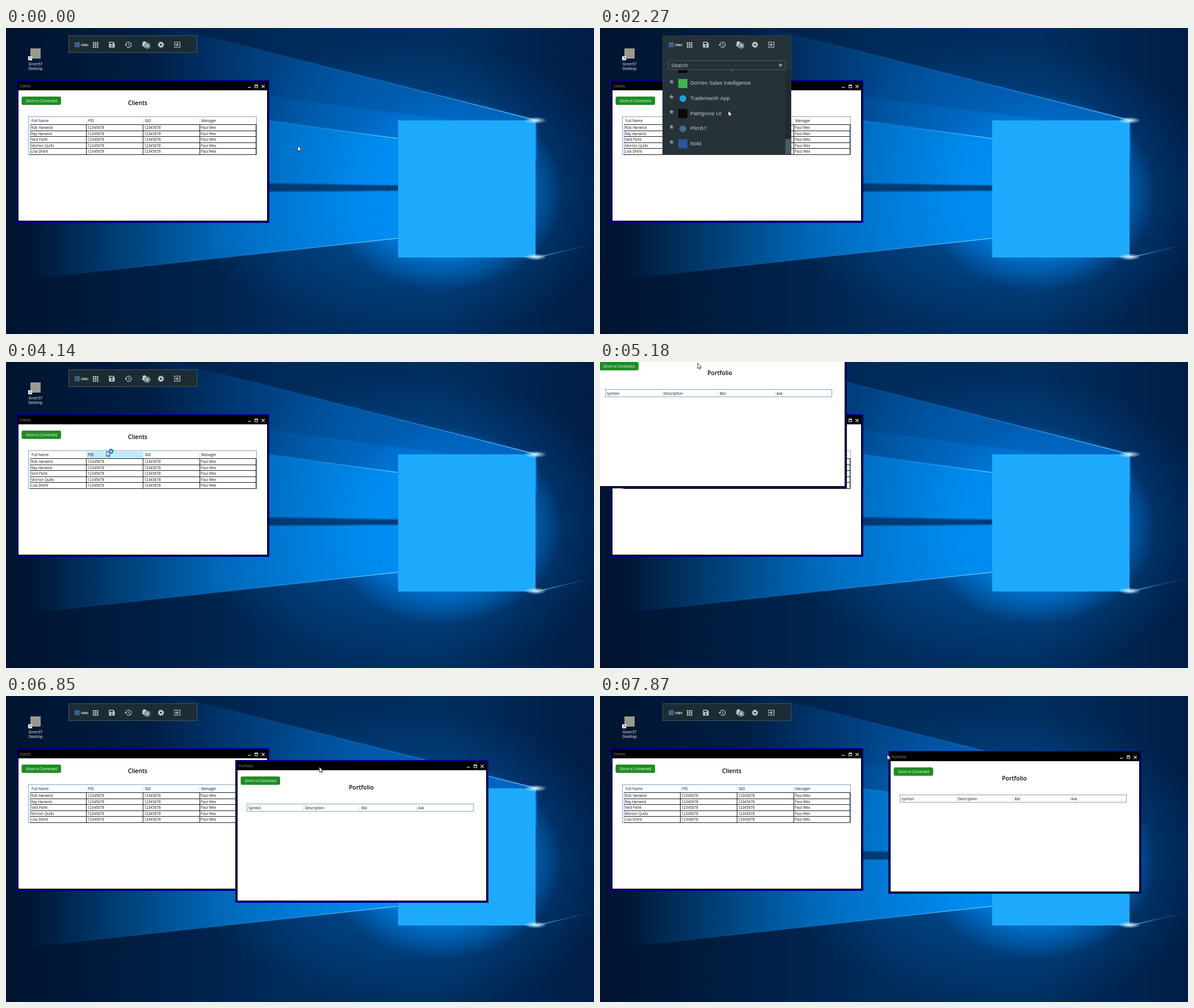
Recreate the animation shown at these times as an HTML page with a canvas. Size 1036 by 540 pixels, loop 8000 ms.

```html
<!DOCTYPE html>
<html lang="en">
<head>
<meta charset="utf-8">
<title>Desktop demo</title>
<style>
html, body { margin: 0; width: 100%; height: 100%; overflow: hidden; background: #001a3c; }
canvas { display: block; }
</style>
</head>
<body>
<canvas id="stage" width="1036" height="540"></canvas>
<script>
const W = 1036, H = 540, LOOP = 8000, TICK = 120, ROW = 26.6, COL = 99.7;
const UI = '"Open Sans", "Noto Sans", sans-serif';
const ARIAL = '"Liberation Sans", Arial, sans-serif';
const stage = document.getElementById('stage').getContext('2d');
let g = stage;

// A move starts at a time and takes some ticks to reach its goal; the picture jumps once per tick.
const move = (start, steps, ...goal) => ({ start, steps, goal });
const pointer = [
  move(0, 1, 514, 208), move(400, 4, 154, 28), move(1370, 4, 226, 146), move(3000, 3, 177, 157),
  move(4820, 4, 172, 2), move(6610, 1, 266, 10), move(6730, 2, 552, 125), move(6970, 5, 656, 108),
  move(7630, 3, 506, 103)
];
const scroll = [move(0, 1, 0), move(1610, 6, 222), move(2550, 2, 107)];
const folio = [move(4420, 1, -11, -29), move(6610, 1, 75, -11), move(6730, 2, 404, 113), move(6970, 4, 508, 97)];

function follow(moves, t) {
  let pos = moves[0].goal;
  for (const { start, steps, goal } of moves) {
    if (t < start) break;
    const p = Math.min(1, (Math.floor((t - start) / TICK) + 1) / steps);
    pos = pos.map((v, i) => Math.round(v + (goal[i] - v) * p));
  }
  return pos;
}
const within = (t, from, to) => t >= from && t < to;

const DARK = '#0a0a08', BLUE = '#3f6a95';
const apps = [
  ['QLN Action tester', DARK, 'bell'], ['QLN Management Console', BLUE, 'disc'], ['Java Demo', DARK],
  ['Manual notifications', BLUE, 'disc'], ['Polbrin Adapter', '#fff'], ['Polbrin Hello', '#fff'],
  ['Orders', DARK], ['Portfolio', DARK], ['Portfolio Summary', DARK],
  ['DorVex Sales Intelligence', '#3db54a'], ['Trademarsh App', '#1fa3e0', 'disc'], ['Pathgrove UI', DARK],
  ['Plim57', BLUE, 'disc'], ['Nold', '#2b579a']
];
const people = ['Rob Hanwick', 'Ray Hanwick', 'Ned Parle', 'Morton Quills', 'Lisa Drent'];

function box(x, y, w, h, fill) { g.fillStyle = fill; g.fillRect(x, y, w, h); }
function frame(x, y, w, h, color) { g.strokeStyle = color; g.lineWidth = 1; g.strokeRect(x + .5, y + .5, w - 1, h - 1); }
function disc(x, y, r, fill) { g.fillStyle = fill; g.beginPath(); g.arc(x, y, r, 0, 7); g.fill(); }
function ring(x, y, r, width, color, from = 0, to = 7) {
  g.strokeStyle = color; g.lineWidth = width;
  g.beginPath(); g.arc(x, y, r, from, to); g.stroke();
}
function path(points) { g.beginPath(); points.forEach(([x, y]) => g.lineTo(x, y)); }
function shape(points, fill) { path(points); g.closePath(); g.fillStyle = fill; g.fill(); }
function line(points, color, width = 1) { path(points); g.strokeStyle = color; g.lineWidth = width; g.stroke(); }
function text(s, x, y, font, color, align = 'left') {
  g.font = font; g.fillStyle = color; g.textAlign = align;
  g.fillText(s, x, y);
}
const label = (s, x, y, color = '#111') => text(s, x, y + 2.3, '6.4px ' + UI, color);

function ramp(x0, x1, ...stops) {
  const r = g.createLinearGradient(x0, 0, x1, 0);
  stops.forEach((c, i) => r.addColorStop(i / (stops.length - 1), c));
  return r;
}
function glow(x, y, rx, ry, color, core = 0) {
  const r = g.createRadialGradient(0, 0, core, 0, 0, 1);
  r.addColorStop(0, color);
  r.addColorStop(1, color.slice(0, 7) + '00');
  g.save(); g.translate(x, y); g.scale(rx, ry);
  box(-1, -1, 2, 2, r);
  g.restore();
}
// Light fan between two edges, fading out to the left; edges are given as y at x0 and x1.
function beam(x0, x1, top, bottom, color) {
  g.filter = 'blur(1px)';
  shape([[x0, top[0]], [x1, top[1]], [x1, bottom[1]], [x0, bottom[0]]], ramp(x0, x1, color + '00', color + 'a0', color));
  g.filter = 'none';
}
const ray = (x0, y0, x1, y1) => line([[x0, y0], [x1, y1]], ramp(x0, x1, '#1080d800', '#1486dc80', '#60c8ff'), 1.5);

function makeWallpaper() {
  const c = document.createElement('canvas');
  c.width = W; c.height = H;
  g = c.getContext('2d');
  box(0, 0, W, H, ramp(0, W, '#00142f', '#001e44', '#002c5c', '#002e5e', '#001d45'));
  glow(710, 285, 390, 265, '#0058a8c0', .2);
  glow(770, 290, 210, 175, '#0084ec', .5);
  beam(250, 935, [-12, 163], [90, 182], '#0068c4');
  beam(250, 935, [90, 182], [134, 232], '#0078dc');
  beam(200, 692, [126, 195], [271, 277], '#008cf0');
  beam(40, 692, [289, 288], [443, 371], '#008cf0');
  beam(200, 692, [274, 278], [289, 287], '#003a70');
  ray(345, 13, 935, 163);
  ray(350, 149, 690, 195);
  ray(60, 440, 690, 371);
  ray(1036, 381, 935, 405);
  box(691, 163, 242, 242, '#1eaafc');
  for (const y of [163, 404]) glow(933, y, 20, 6, '#d8f4ff');
  g = stage;
  return c;
}

function shortcut() {
  box(43, 36, 18, 18, '#9a9a8c');
  box(39, 50, 7, 7, '#f4f4f4');
  line([[40.5, 55.5], [44, 52]], '#2468b0');
  line([[41.5, 52], [44, 52], [44, 54.5]], '#2468b0');
  ['Grom57', 'Desktop'].forEach((s, i) => text(s, 52, 66 + i * 8.2, '6.5px ' + UI, '#fff', 'center'));
}

function bell(x, y, color) {
  g.beginPath(); g.arc(x, y - 2, 3.5, Math.PI, 0);
  g.lineTo(x + 3.5, y + 1); g.lineTo(x + 5, y + 3); g.lineTo(x - 5, y + 3); g.lineTo(x - 3.5, y + 1);
  g.fillStyle = color; g.fill();
  disc(x, y + 4.3, 1.3, color);
}
function star(x, y, r, color) {
  shape(Array.from({ length: 10 }, (_, i) => {
    const a = i * Math.PI / 5 - Math.PI / 2, q = i % 2 ? r * .42 : r;
    return [x + q * Math.cos(a), y + q * Math.sin(a)];
  }), color);
}

function toolbar(open, hover) {
  const ink = '#c3ced2', back = '#1c2c34', height = open ? 210 : 31, y = 29.5;
  box(110, 13, 226.5, height, open ? '#263238' : back);
  frame(110, 13, 227, open ? height : 31, open ? '#2f3d43' : '#42555a');
  box(121, 25, 9, 9, '#37648c');
  text('ORBA', 132, 31.6, 'bold 4.5px ' + ARIAL, '#e8eef0');
  for (let i = 0; i < 9; i++)
    box(153 + i % 3 * 3.6, 25 + (i / 3 | 0) * 3.6, 2.5, 2.5, hover ? '#e4e620' : ink);

  shape([[181.5, 24.5], [189, 24.5], [191.5, 27], [191.5, 34.5], [181.5, 34.5]], ink);
  box(183, 26, 5.5, 2.5, back);
  disc(186.5, 31.5, 1.6, back);

  ring(216, y, 4.7, 1.2, ink, -Math.PI, 2.3);
  shape([[209, 29], [213.6, 29], [211.3, 31.8]], ink);
  line([[216, 27], [216, 30], [218.3, 31.3]], ink);

  bell(244, 29, ink);
  disc(249, 31.2, 5.4, '#7c8b91');
  text('8', 249, 33.4, 'bold 6px ' + ARIAL, '#fff', 'center');

  ring(273, y, 3.1, 2.6, ink);
  g.setLineDash([1.8, 1.81]);
  ring(273, y, 4.6, 2, ink);
  g.setLineDash([]);

  line([[297, 27.5], [297, 25], [306.5, 25], [306.5, 34], [297, 34], [297, 31.5]], ink, 1.2);
  line([[296, y], [303, y]], ink, 1.2);
  line([[300.8, 27], [303.3, y], [300.8, 32]], ink, 1.2);
}

function menu(offset) {
  frame(120, 57, 207, 17, '#46575d');
  text('Search', 125.5, 69.3, '9.2px ' + ARIAL, '#c0cacd');
  star(318, 65.5, 4.3, '#8b9a9f');
  g.save();
  g.beginPath(); g.rect(111, 74, 225, 148.5); g.clip();
  apps.forEach(([name, color, kind], i) => {
    const y = 79.5 + i * ROW - offset;
    star(126, y - 2, 4.7, '#87969b');
    if (kind === 'disc') disc(146, y + 1, 6, color);
    else box(138, y - 7, 16, 16, color);
    if (kind === 'bell') bell(146, y + 1, '#c6ee10');
    text(name, 159, y + 3.4, '9.4px ' + ARIAL, '#c3cccf');
  });
  box(326.5, 74, 10, 149, '#1f2b30');
  box(326.5, 157 + offset * .176, 10, 27, '#4b5c63');
  g.restore();
}

function appWindow(x, y, title, headX, headY) {
  box(x, y, 446, 252, '#000090');
  box(x + 2, y + 2, 442, 248, '#000');
  box(x + 4, y + 18, 438, 230, '#fff');
  label(title, x + 6, y + 11, '#909090');
  box(x + 408, y + 12, 5.5, 1.2, '#ddd');
  frame(x + 420, y + 8, 6, 6, '#ddd');
  box(x + 420, y + 8, 6, 2, '#ddd');
  for (const d of [-2.7, 2.7]) line([[x + 435 - d, y + 8.5], [x + 435 + d, y + 13.9]], '#ddd', 1.1);
  g.fillStyle = '#1f8c22';
  g.beginPath(); g.roundRect(x + 9.5, y + 29, 69.5, 14.7, 3); g.fill();
  text('Grom is Connected', x + 44.5, y + 38.8, '500 6.2px ' + UI, '#fff', 'center');
  text(title, x + headX, y + headY + 3.8, '600 10.4px ' + UI, '#000', 'center');
}
function header(names, x, y) {
  names.forEach((name, i) => {
    label(name, x + 3 + i * COL, y);
    if (i) box(Math.round(x + i * COL), y - 4, 1, 9, '#cfd6dc');
  });
}

function clients(hover) {
  const left = 42, top = 170, rowH = 10.55, edge = '#7fa2c6', ink = '#1a1a1a';
  appWindow(18, 92, 'Clients', 214, 40);
  if (hover) box(142, 158, COL, 12, '#bfeafb');
  frame(39, 156, 403, 68, edge);
  header(['Full Name', 'PID', 'GID', 'Manager'], left, 164);
  people.forEach((name, r) => [name, '12345678', '12345678', 'Paul Wex'].forEach((s, i) =>
    label(s, left + 2 + i * COL, top + 5.7 + r * rowH)));
  for (let r = 0; r <= 5; r++) box(left, Math.round(top + r * rowH), 399, 1, ink);
  for (let i = 0; i <= 4; i++) box(Math.floor(left + i * COL), top, 1, 53, i ? ink : edge);
}

function portfolio(x, y) {
  appWindow(x, y, 'Portfolio', 222, 48);
  frame(x + 20, y + 77, 400, 14, '#7fa2c6');
  header(['Symbol', 'Description', 'Bid', 'Ask'], x + 20, y + 84.3);
}

function cursor(x, y, kind) {
  const arrow = [[0, 0], [0, 9.6], [2.2, 7.6], [3.7, 10.8], [5.2, 10.1], [3.8, 7], [6.8, 7]];
  const hand = [[-1, 0], [1, 0], [1, 4], [5, 5.2], [4, 12.5], [-1.5, 12.5], [-4, 7], [-1, 8]];
  const outline = kind === 'hand' ? hand : arrow;
  g.save(); g.translate(x, y);
  shape(outline, '#fff');
  line([...outline, outline[0]], '#111', .8);
  if (kind === 'busy') ring(8, .5, 3.1, 2.6, '#1583d4');
  g.restore();
}
function cursorKind(t) {
  if (within(t, 940, 1370) || within(t, 2850, 3490)) return 'hand';
  return within(t, 4140, 4420) ? 'busy' : 'arrow';
}

const wallpaper = makeWallpaper();

function draw() {
  const t = performance.now() % LOOP;
  const open = within(t, 1220, 3490);
  g.drawImage(wallpaper, 0, 0);
  shortcut();
  clients(within(t, 3490, 4420));
  toolbar(open, within(t, 790, 1370));
  if (open) menu(...follow(scroll, t));
  if (t >= folio[0].start) portfolio(...follow(folio, t));
  cursor(...follow(pointer, t), cursorKind(t));
  requestAnimationFrame(draw);
}
draw();
</script>
</body>
</html>
```
